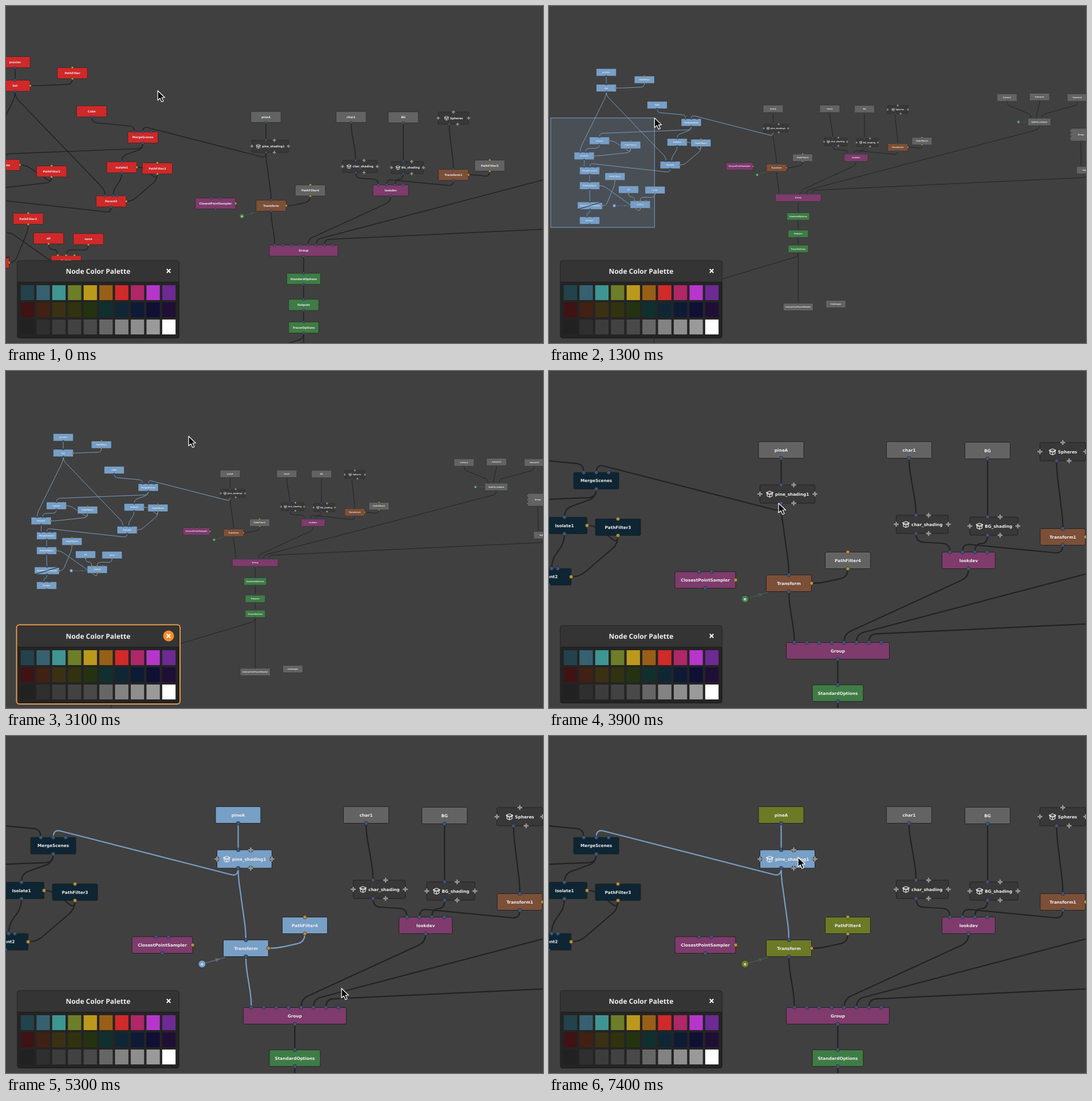
Animation, 938 px wide and 589 px high, one loop 8000 ms. Source, as an HTML page:

```html
<!DOCTYPE html>
<html lang="en">
<head>
<meta charset="utf-8">
<title>Node color palette</title>
<style>
  html, body { margin: 0; width: 100%; height: 100%; overflow: hidden; background: #404040; }
  svg { display: block; width: 100vw; height: 100vh; }
  text { text-anchor: middle; text-rendering: geometricPrecision; }
  #graph text { font: bold 7.3px "DejaVu Sans", sans-serif; fill: #eee; }
  #edges { fill: none; stroke-width: 2.2; }
  #title { font: 700 12px "Noto Sans", sans-serif; fill: #f2f2f2; }
</style>
</head>
<body>
<svg id="stage" viewBox="0 0 938 589">
  <g id="graph"><g id="edges"></g><g id="nodes"></g></g>
  <rect id="marquee" fill="#789fc6" fill-opacity=".15" stroke="#789fc6"/>
  <g id="palette">
    <rect x="19.5" y="445" width="283" height="135.5" rx="4" fill="#343434" stroke="#242424"/>
    <path d="M21 482.5H301.5V577.5a2 2 0 0 1-2 2H23a2 2 0 0 1-2-2z" fill="#242424" stroke="#1c1c1c"/>
    <rect id="focus" x="18.5" y="443.5" width="285.5" height="138.5" rx="5" fill="none" stroke="#e8984a" stroke-width="2"/>
    <circle id="closeGlow" cx="284" cy="463" r="9.5" fill="#f68d28"/>
    <path d="M280.8 459.8l6.4 6.4m0-6.4l-6.4 6.4" stroke="#fff" stroke-width="2"/>
    <text id="title" x="161" y="467.5">Node Color Palette</text>
  </g>
  <path id="cursor" d="M0 0V16.8L4 13.2 6.9 19.7 10 18.3 7.1 12H12.3Z" fill="#0c0c0c" stroke="#fff" stroke-width="1.2" stroke-linejoin="round"/>
</svg>
<script>
const $ = id => document.getElementById(id);
const RED = '#cf2929', NAVY = '#0e2533', OLIVE = '#6c7a26', GRAY = '#636363', DARK = '#383838',
  PURPLE = '#7e3b6c', BROWN = '#7c4f38', GREEN = '#3f7c45', SELECTED = '#789fc6',
  EDGE = '#222', BLUE_PLUG = '#3d5680', GOLD_PLUG = '#b9913a';

function el(tag, attrs, parent, text) {
  const e = document.createElementNS('http://www.w3.org/2000/svg', tag);
  for (const k in attrs) e.setAttribute(k, attrs[k]);
  if (text) e.textContent = text;
  parent.append(e);
  return e;
}
const spread = n => Array.from({length: n}, (_, i) => (i - (n - 1) / 2) * 21.7);

// ---- graph ----
const nodes = {}, edges = [];

function plug(g, x, y, color) {
  el('circle', {cx: x, cy: y, r: 3.2, fill: color, stroke: '#262626', 'stroke-width': .7}, g);
}
function plus(g, x, y) {
  const d = `M${x - 4.3} ${y}h8.6M${x} ${y - 4.3}v8.6`;
  el('path', {d, stroke: '#262626', 'stroke-width': 4.6}, g);
  el('path', {d, stroke: '#939393', 'stroke-width': 2.8}, g);
}
function node(label, x, y, color, o = {}) {
  const n = {x, y, color, w: 79, h: 29, top: [0], bottom: [0], plugColor: BLUE_PLUG, id: label, ...o};
  const g = el('g', {transform: `translate(${x} ${y})`}, $('nodes'));
  const {w, h} = n;
  n.shape = el('rect', {x: -w / 2, y: -h / 2, width: w, height: h, rx: 2, stroke: '#1f1f1f', 'stroke-width': .9}, g);
  el('text', {x: n.icon ? 8.2 : 0, y: 2.6}, g, label);
  n.top.forEach(px => plug(g, px, -h / 2, n.plugColor));
  n.bottom.forEach(px => plug(g, px, h / 2, n.plugColor));
  if (n.side) plug(g, w / 2, 0, GOLD_PLUG);
  if (n.off) el('path', {d: `M${-w / 2} ${h / 2}L${w / 2} ${-h / 2}`, stroke: '#1c1c1c', 'stroke-width': 2.4}, g);
  if (n.icon) {
    plus(g, -w / 2, 0);
    plus(g, w / 2, 0);
    plus(g, n.top.length ? 11 : 0, -h / 2);
    plus(g, 11, h / 2);
    el('path', {
      transform: `translate(${n.icon - x} 0)`, fill: 'none', stroke: '#eee', 'stroke-width': 1.1, 'stroke-linejoin': 'round',
      d: 'M-4.5-.5V3.5L0 5.5 4.5 3.5V-.5M0 1.2V5.5M0-5L-5.8-2.5-4.5-.5 0 1.2 4.5-.5 5.8-2.5ZM-5.8-2.5L0-.5 5.8-2.5'
    }, g);
  }
  return nodes[n.id] = n;
}
const box = (label, x, y, w, icon, o) =>
  node(label, x, y, DARK, {w, icon, h: 32, top: [-10.9], bottom: [-10.9], ...o});
const filter = (label, x, y, color, o) => node(label, x, y, color, {plugColor: GOLD_PLUG, ...o});

function dot(id, x, y, color, group, x2, y2) {
  const g = $('nodes'), len = Math.hypot(x2 - x, y2 - y), angle = Math.atan2(y2 - y, x2 - x) * 180 / Math.PI;
  const line = el('path', {
    d: `M7 0H${len}M${len * .72 - 6}-2.8L${len * .72} 0L${len * .72 - 6} 2.8`, fill: 'none', 'stroke-width': 1.1,
    transform: `translate(${x} ${y}) rotate(${angle})`, 'stroke-opacity': .7
  }, g);
  const shape = el('circle', {cx: x, cy: y, r: 6.6, stroke: '#262626', 'stroke-width': .8}, g);
  el('text', {x, y: y + 2.2}, g, 'e');
  nodes[id] = {id, color, group, shape, line};
}

// Straight run between two short stubs, with rounded corners.
function wire(x1, y1, x2, y2, sideways) {
  const stub = 14.5, ay = y1 + stub, bx = x2 + (sideways ? stub : 0), by = y2 - (sideways ? 0 : stub);
  const len = Math.hypot(bx - x1, by - ay) || 1, r = Math.min(13, len / 2) / len;
  const dx = (bx - x1) * r, dy = (by - ay) * r;
  return `M${x1} ${y1}Q${x1} ${ay} ${x1 + dx} ${ay + dy}L${bx - dx} ${by - dy}Q${bx} ${by} ${x2} ${y2}`;
}
function link(from, to, port = 0) {
  const a = nodes[from], b = nodes[to], side = port === 'side';
  const d = wire(a.x + a.bottom[0], a.y + a.h / 2,
    b.x + (side ? b.w / 2 : b.top[port]), b.y - (side ? 0 : b.h / 2), side);
  edges.push({a, b, path: el('path', {d}, $('edges'))});
}
const chain = (...ids) => ids.slice(1).forEach((id, i) => link(ids[i], id));

const left = {group: 'left'}, leftSide = {...left, side: true}, parentPorts = {...leftSide, top: [-16, 5.4, 16.2]};
node('proxies', -253, -6, RED, {...left, top: []});
node('Set', -253, 56, RED, leftSide);
filter('PathFilter', -102.5, 23, RED, left);
node('Cube', -52, 123.3, RED, {...left, top: []});
node('MergeScenes', 82.5, 191.8, RED, {...left, top: spread(3)});
node('Isolate1', 27, 270, RED, leftSide);
filter('PathFilter3', 120.5, 273, RED, left);
node('Parent2', -.8, 359.7, RED, parentPorts);
node('Isolate', -280, 264, RED, leftSide);
filter('PathFilter1', -157, 281, RED, left);
node('Parent1', -340, 324, RED, parentPorts);
node('MergeScenes1', -318.6, 382.7, RED, {...left, top: spread(3)});
node('DeleteObject', -318.6, 441.5, RED, leftSide);
node('StandardAttributes', -317.5, 520.5, RED, {...leftSide, w: 98, off: true});
node('Group1', -318.6, 579, RED, {...left, top: spread(2)});
filter('PathFilter2', -218.5, 405.3, RED, left);
filter('all', -165, 456.8, RED, {...left, top: []});
filter('none', -60.5, 458.8, RED, {...left, top: []});
filter('Switch', -118.8, 516, RED, {...left, top: spread(3)});
dot('leftDot', -221.4, 520.6, RED, 'left', -158.5, 520.6);

const pine = {group: 'pine'};
node('pineA', 405.5, 138, GRAY, {...pine, top: []});
box('pine_shading1', 416.5, 215, 96, 385.5, pine);
filter('PathFilter4', 522, 331, GRAY, pine);
node('Transform', 419, 371, BROWN, {...pine, side: true});
dot('pineDot', 342.5, 398.5, '#477a4c', 'pine', 383, 387);
node('ClosestPointSampler', 273, 365.3, PURPLE, {w: 106, top: spread(2), side: true});

node('char1', 629, 138, GRAY, {top: []});
node('BG', 766, 139, GRAY, {top: []});
box('char_shading', 652, 268, 91, 623.5);
box('BG_shading', 777, 271, 84, 752);
box('Spheres', 897.5, 141, 80, 879.5, {top: []});
node('Transform1', 897.5, 290, BROWN, {side: true});
filter('PathFilter5', 993, 265.8, GRAY);
node('lookdev', 733, 331, PURPLE, {w: 93, top: spread(4)});
node('Group', 504.5, 489, PURPLE, {w: 180, top: spread(8)});
node('StandardOptions', 504.5, 563, GREEN, {w: 89});
node('Outputs', 504.5, 631.5, GREEN);
node('TracerOptions', 504.5, 691, GREEN);
node('InteractiveTracerRender', 504.5, 920.5, GRAY, {w: 118, bottom: []});
node('Catalogue', 653, 909, GRAY, {top: []});
node('Camera', 1328.5, 93.5, GRAY, {top: []});
node('Camera1', 1457, 91, GRAY, {top: []});
node('Camera2', 1606, 93.5, GRAY, {top: []});
node('Switch_camera', 1456, 189.6, GRAY, {w: 90, top: spread(4)});
dot('cameraDot', 1373.7, 189.6, '#477a4c', '', 1411, 189.6);
node('Group', 1620, 240.4, GRAY, {id: 'rightGroup', h: 50, top: [], bottom: [0]});
spread(3).forEach(y => plug($('nodes'), 1580.5, 240.4 + y * .7, '#7d7d7d'));
node('Switch1', 1643, 380, GRAY, {top: spread(3)});

chain('proxies', 'Set');
link('PathFilter', 'Set', 'side');
link('Set', 'Parent1');
link('Set', 'Parent2');
link('Cube', 'MergeScenes');
link('MergeScenes', 'Isolate');
link('MergeScenes', 'Isolate1');
link('Isolate', 'Parent1', 1);
link('Isolate1', 'Parent2', 1);
['Isolate1', 'Parent2'].forEach(id => link('PathFilter3', id, 'side'));
['Isolate', 'Parent1'].forEach(id => link('PathFilter1', id, 'side'));
link('Parent2', 'MergeScenes1', 1);
chain('Parent1', 'MergeScenes1', 'DeleteObject', 'StandardAttributes', 'Group1');
link('PathFilter2', 'StandardAttributes', 'side');
link('Switch', 'DeleteObject', 'side');
link('all', 'Switch', 0);
link('none', 'Switch', 1);
chain('pineA', 'pine_shading1', 'Transform', 'Group');
link('pine_shading1', 'MergeScenes', 1);
link('PathFilter4', 'Transform', 'side');
chain('char1', 'char_shading', 'lookdev');
chain('BG', 'BG_shading');
link('BG_shading', 'lookdev', 2);
chain('Spheres', 'Transform1');
link('Transform1', 'lookdev', 1);
link('PathFilter5', 'Transform1', 'side');
link('lookdev', 'Group', 4);
link('Switch_camera', 'Group', 5);
link('Switch1', 'Group', 6);
chain('Group', 'StandardOptions', 'Outputs', 'TracerOptions', 'InteractiveTracerRender');
['Camera', 'Camera1', 'Camera2'].forEach((id, i) => link(id, 'Switch_camera', i));
chain('rightGroup', 'Switch1');
el('path', {d: wire(504.5, 705.5, -64.4, 905) + 'V1100', stroke: EDGE}, $('edges'));

// ---- palette swatches ----
const swatches = [
  '23424b 376170 3f9591 6e7d27 bb991c 985f17 d02a2a ae2767 b636cb 6c2a92',
  '3f1214 402113 3a3013 31320f 24330f 0f302e 0f2735 0e1b35 100f34 200f34',
  '212121 2f2f2f 3c3c3c 424242 494949 666666 838383 8e8e8e 9a9a9a ffffff'];
swatches.forEach((row, r) => row.split(' ').forEach((c, i) =>
  el('rect', {x: 25.8 + i * 27.45, y: 488 + r * 30, width: 23.3, height: 26, fill: '#' + c}, $('palette'))));

// ---- timeline ----
const LOOP = 8000, STEP = 100;
const cursorKeys = [
  [0, 265, 148], [600, 265, 148], [1000, 58, 272], [1100, 3, 387], [1400, 275, 100], [1500, 275, 100],
  [1700, 216, 502], [1900, 203, 529], [2500, 203, 529], [3100, 319, 114], [3300, 319, 114],
  [3500, 380, 213], [3800, 380, 213], [3900, 401, 231], [4300, 330, 88], [4500, 330, 88],
  [5100, 586, 441], [5300, 586, 441], [5600, 920, 95], [6000, 125, 508], [6200, 125, 508],
  [6600, 330, 78], [6800, 330, 78], [7000, 375, 165], [7400, 435, 212], [LOOP, 435, 212]];
const between = (t, a, b) => t >= a && t < b;

function cursorAt(t) {
  const i = cursorKeys.findIndex(k => k[0] > t);
  const [t0, x0, y0] = cursorKeys[i - 1], [t1, x1, y1] = cursorKeys[i];
  const u = (t - t0) / (t1 - t0);
  return [x0 + (x1 - x0) * u, y0 + (y1 - y0) * u];
}
function viewAt(t) {
  if (t < 400) return [.6655, 184.2, 102.1];
  const far = .4426, u = Math.min(1, Math.max(0, (t - 3400) / 400));
  const s = far ** (1 - u);
  return [s, 380.3 * (1 - s), 212.8 * (1 - s)];
}
function isSelected(n, t) {
  return n.group === 'left' && between(t, 1300, 3300)
    || n.group === 'pine' && between(t, 5000, 6800)
    || n.id === 'pine_shading1' && t >= 7300;
}
function colorOf(n, t) {
  if (isSelected(n, t)) return SELECTED;
  if (n.group === 'left' && t >= 2100) return NAVY;
  if (n.group === 'pine' && t >= 6100) return OLIVE;
  return n.color;
}

function draw(t) {
  const [s, x, y] = viewAt(t), [cx, cy] = cursorAt(t);
  $('graph').setAttribute('transform', `translate(${x} ${y}) scale(${s})`);
  $('cursor').setAttribute('transform', `translate(${cx} ${cy})`);
  for (const n of Object.values(nodes)) {
    n.shape.setAttribute('fill', colorOf(n, t));
    if (n.line) n.line.setAttribute('stroke', isSelected(n, t) ? SELECTED : n.color);
  }
  for (const e of edges)
    e.path.setAttribute('stroke', isSelected(e.a, t) || isSelected(e.b, t) ? SELECTED : EDGE);

  const start = between(t, 1200, 1500) ? [3, 387] : between(t, 4600, 5200) ? [330, 88] : null;
  const m = $('marquee');
  m.style.display = start ? '' : 'none';
  if (start) {
    m.setAttribute('x', Math.min(start[0], cx));
    m.setAttribute('y', Math.min(start[1], cy));
    m.setAttribute('width', Math.abs(cx - start[0]));
    m.setAttribute('height', Math.abs(cy - start[1]));
  }
  const focused = between(t, 2600, 3300) || between(t, 6200, 6800);
  $('focus').style.display = $('closeGlow').style.display = focused ? '' : 'none';
}

let origin, last;
function tick(now) {
  origin ??= now;
  const t = Math.floor((now - origin) % LOOP / STEP) * STEP;
  if (t !== last) draw(last = t);
  requestAnimationFrame(tick);
}
draw(0);
requestAnimationFrame(tick);
</script>
</body>
</html>
```
